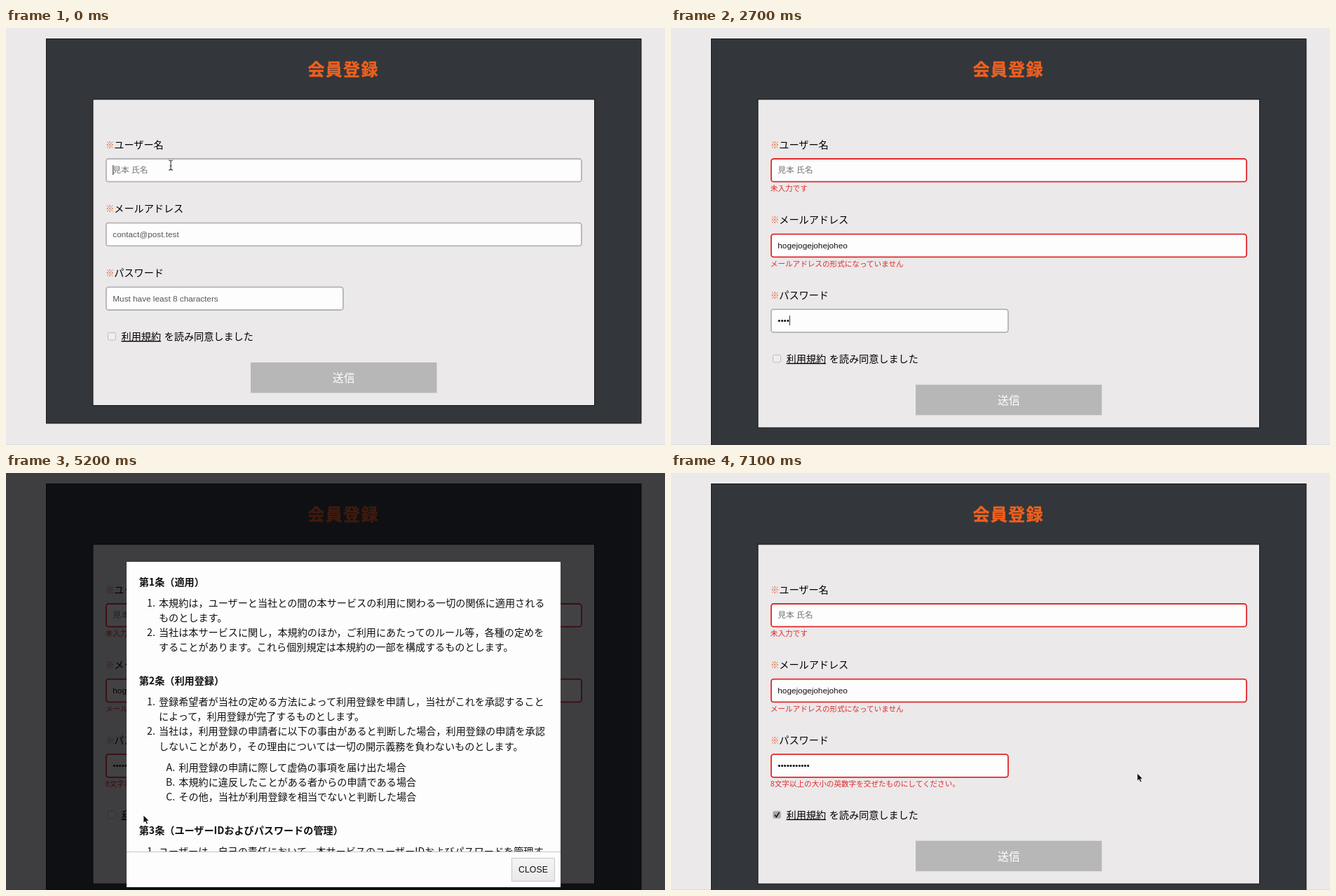
An HTML page for the animation above (7.2 s loop, 940 by 596 pixels).

```html
<!DOCTYPE html>
<html lang="ja">
<head>
<meta charset="utf-8">
<title>会員登録</title>
<style>
  html, body { margin: 0; width: 100%; height: 100%; overflow: hidden; background: #ebe9ea; }
  body { font: 14.13px/21.2px "Noto Sans CJK JP", "Noto Sans CJK", sans-serif; color: #111;
         text-spacing-trim: space-all; text-autospace: no-autospace; }
  svg, #modal { position: absolute; left: 0; top: 0; width: 940px; height: 596px; }
  .star { font-size: 12.36px; fill: #ee5a26; }
  .latin { font: 11.78px "Liberation Sans", Arial, sans-serif; }
  .field { fill: #fdfdfd; stroke-width: 1.8; }
  .error { font-size: 10.6px; fill: #e2282a; }
  #modal { background: rgba(4, 4, 8, .745); }
  #dialog { position: absolute; left: 172px; top: 127px; width: 619px; height: 465px; background: #fdfdfd; }
  #view { position: relative; height: 414px; overflow: hidden; border-bottom: 1px solid #c4c4c4; }
  #terms { position: absolute; top: 0; left: 0; width: 619.5px; box-sizing: border-box; padding: 17.7px 17.7px 0; }
  #thumb { position: absolute; left: 611px; width: 7px; height: 50px; border-radius: 3.5px; background: #6c6c6c; }
  #close { position: absolute; left: 549px; top: 423px; width: 60px; height: 32px; border: 1px solid #c6c6c6;
           background: linear-gradient(#f4f4f4, #e9e9e9); text-align: center;
           font: 12.36px/32px "Liberation Sans", Arial, sans-serif; }
  h3 { font-size: 14.13px; line-height: 21.2px; margin: 0 0 8.83px; }
  p, ol { margin: 0 0 26.5px; }
  ol { padding-left: 26.3px; }
  li { padding-left: 2px; }
  ol ol { margin: 8.83px 0 0; list-style: upper-alpha; }
</style>
</head>
<body>
<svg id="form" viewBox="0 0 940 596">
  <rect y="595" width="940" height="1" fill="#dddcdd"/>
  <rect id="outer" x="57.5" y="15.5" width="848.5" fill="#33373c" stroke="#14171a"/>
  <text x="430.5" y="68" font-size="24" font-weight="700" letter-spacing="1.3" fill="#f0601e" stroke="#f0601e" stroke-width=".4">会員登録</text>
  <rect id="inner" x="124" y="102" width="715.5" fill="#ebe9ea" stroke="#111"/>
  <g id="user"></g>
  <g id="mail"></g>
  <g id="pass"></g>
  <g id="submit">
    <rect id="box" x="145.5" y="435.5" width="11" height="10.5" rx="2" stroke="#bdbdbd"/>
    <path id="tick" d="M148 441l2.4 2.8 4-6.4" fill="none" stroke="#222" stroke-width="1.8"/>
    <text x="164.5" y="446" text-decoration="underline">利用規約</text>
    <text x="225.7" y="446">を読み同意しました</text>
    <rect x="349" y="478" width="265.5" height="43.5" fill="#b7b7b7"/>
    <text x="481.7" y="506" font-size="15.9" text-anchor="middle" fill="#fff">送信</text>
  </g>
</svg>
<div id="modal">
  <div id="dialog">
    <div id="view"><div id="terms"></div><div id="thumb"></div></div>
    <div id="close">CLOSE</div>
  </div>
</div>
<svg viewBox="0 0 940 596">
  <g id="pointer">
    <path id="arrow" d="M0 0V11.3L2.6 9 4.4 13 6.5 12.1 4.8 8.2H8.2Z" fill="#111" stroke="#fff" stroke-width=".8"/>
    <path id="beam" d="M-3-7Q0-7 0-5Q0-7 3-7M0-5V5M-3 7Q0 7 0 5Q0 7 3 7M-1.5 1H1.5" fill="none" stroke="#333" stroke-width="1.1"/>
    <path id="hand" d="M-3-6Q-1.5-8 0-5L1.3-2 4-1.5 6.3 0 6.5 4 5 8.5H-.5L-4.5 3.5-5.5.5-3 1-1-.2Z M1 3V6M3.2 3V6" fill="#fff" stroke="#222" stroke-width="1.2"/>
  </g>
</svg>
<script>
const $ = id => document.getElementById(id);
const show = (id, on) => $(id).style.visibility = on ? 'visible' : 'hidden';
const ROW = 15.9;      // height an error message adds
const LOOP = 7200, STEP = 100;

// Form fields
const fields = {
  user: { top: 187, width: 678, label: 'ユーザー名', hint: '見本 氏名', error: '未入力です' },
  mail: { top: 278.7, width: 678, label: 'メールアドレス', hint: 'contact@post.test', error: 'メールアドレスの形式になっていません' },
  pass: { top: 370.3, width: 338, label: 'パスワード', hint: 'Must have least 8 characters', error: '8文字以上の大小の英数字を交ぜたものにしてください。' }
};
for (const [id, { top, width, label, error }] of Object.entries(fields)) {
  $(id).innerHTML = `
    <text class="star" x="142" y="${top - 15.5}">※</text>
    <text x="154.3" y="${top - 15.5}">${label}</text>
    <rect class="field" id="${id}Box" x="142.9" y="${top}" width="${width}" height="32.7" rx="3.5"/>
    <text class="latin" id="${id}Text" x="152.3" y="${top + 20.3}"></text>
    <rect id="${id}Caret" y="${top + 9}" width="1" height="14" fill="#222"/>
    <text class="error" id="${id}Error" x="141.8" y="${top + 46}">${error}</text>`;
}
$('mail').insertAdjacentHTML('beforeend',
  '<path id="spell" d="M152.5 301.5H252" stroke="#e2282a" stroke-width="1.6" stroke-dasharray="1.6 1.2"/>');

// Terms: an article body is a paragraph or a list; a list item may carry a sublist
const articles = [
  ['適用', ['本規約は，ユーザーと当社との間の本サービスの利用に関わる一切の関係に適用されるものとします。',
    '当社は本サービスに関し，本規約のほか，ご利用にあたってのルール等，各種の定めをすることがあります。これら個別規定は本規約の一部を構成するものとします。']],
  ['利用登録', ['登録希望者が当社の定める方法によって利用登録を申請し，当社がこれを承認することによって，利用登録が完了するものとします。',
    ['当社は，利用登録の申請者に以下の事由があると判断した場合，利用登録の申請を承認しないことがあり，その理由については一切の開示義務を負わないものとします。',
      ['利用登録の申請に際して虚偽の事項を届け出た場合', '本規約に違反したことがある者からの申請である場合', 'その他，当社が利用登録を相当でないと判断した場合']]]],
  ['ユーザーIDおよびパスワードの管理', ['ユーザーは，自己の責任において，本サービスのユーザーIDおよびパスワードを管理するものとします。',
    'ユーザーは，いかなる場合にも，ユーザーIDおよびパスワードを第三者に譲渡または貸与することはできません。',
    'ユーザーIDおよびパスワードが第三者によって使用されたことによって生じた損害は，当社に故意または重大な過失がある場合を除き，当社は一切の責任を負わないものとします。']],
  ['利用料金および支払方法', ['ユーザーは，本サービスの有料部分の対価として，当社が別途定める利用料金を，当社が指定する方法により支払うものとします。',
    'ユーザーが利用料金の支払を遅滞した場合には，ユーザーは年14.6％の割合による遅延損害金を支払うものとします。']],
  ['禁止事項', [['ユーザーは，本サービスの利用にあたり，以下の行為をしてはなりません。',
    ['法令または公序良俗に違反する行為', '犯罪行為に関連する行為', '本サービスに含まれる知的財産権を侵害する行為', 'サーバーまたはネットワークの機能を破壊したり，妨害したりする行為',
      '本サービスによって得られた情報を商業的に利用する行為', '当社のサービスの運営を妨害するおそれのある行為', '不正アクセスをし，またはこれを試みる行為', '他のユーザーに関する個人情報等を収集または蓄積する行為',
      '不正な目的を持って本サービスを利用する行為', '他のユーザーに不利益，損害，不快感を与える行為', '他のユーザーに成りすます行為', '面識のない異性との出会いを目的とした行為', 'その他，当社が不適切と判断する行為']]]],
  ['本サービスの提供の停止等', [['当社は，以下のいずれかの事由があると判断した場合，ユーザーに事前に通知することなく本サービスの全部または一部の提供を停止または中断することができるものとします。',
    ['本サービスにかかるコンピュータシステムの保守点検または更新を行う場合', '地震，落雷，火災，停電または天災などの不可抗力により，本サービスの提供が困難となった場合',
      'コンピュータまたは通信回線等が事故により停止した場合', 'その他，当社が本サービスの提供が困難と判断した場合']],
    '当社は，本サービスの提供の停止または中断により，ユーザーまたは第三者が被ったいかなる不利益または損害についても，一切の責任を負わないものとします。']],
  ['利用制限および登録抹消', [['当社は，ユーザーが以下のいずれかに該当する場合には，事前の通知なく，ユーザーに対して，本サービスの全部もしくは一部の利用を制限し，またはユーザーとしての登録を抹消することができるものとします。',
    ['本規約のいずれかの条項に違反した場合', '登録事項に虚偽の事実があることが判明した場合', '料金等の支払債務の不履行があった場合', '当社からの連絡に対し，一定期間返答がない場合',
      '本サービスについて，最後の利用から一定期間利用がない場合', 'その他，当社が本サービスの利用を適当でないと判断した場合']],
    '当社は，本条に基づき当社が行った行為によりユーザーに生じた損害について，一切の責任を負いません。']],
  ['退会', 'ユーザーは，当社の定める退会手続により，本サービスから退会できるものとします。'],
  ['保証の否認および免責事項', ['当社は，本サービスに事実上または法律上の瑕疵がないことを明示的にも黙示的にも保証しておりません。',
    '当社は，本サービスに起因してユーザーに生じたあらゆる損害について一切の責任を負いません。ただし，本サービスに関する契約が消費者契約となる場合，この免責規定は適用されません。',
    '当社は，ユーザーと他のユーザーまたは第三者との間において生じた取引，連絡または紛争等について一切責任を負いません。']],
  ['サービス内容の変更等', '当社は，ユーザーに通知することなく，本サービスの内容を変更しまたは本サービスの提供を中止することができるものとし，これによってユーザーに生じた損害について一切の責任を負いません。'],
  ['利用規約の変更', '当社は，必要と判断した場合には，ユーザーに通知することなくいつでも本規約を変更することができるものとします。変更後に本サービスの利用を開始した場合には，当該ユーザーは変更後の規約に同意したものとみなします。'],
  ['個人情報の取扱い', '当社は，本サービスの利用によって取得する個人情報については，当社の定める方針に従い適切に取り扱うものとします。'],
  ['通知または連絡', 'ユーザーと当社との間の通知または連絡は，当社の定める方法によって行うものとします。<br>当社は,ユーザーから,当社が別途定める方式に従った変更届け出がない限り,現在登録されて<br>いる連絡先が有効なものとみなして当該連絡先へ通知または連絡を行い,これらは,発信時に<br>ユーザーへ到達したものとみなします。'],
  ['権利義務の譲渡の禁止', 'ユーザーは，当社の書面による事前の承諾なく，利用契約上の地位または本規約に基づく権利もしくは義務を第三者に譲渡し，または担保に供することはできません。'],
  ['準拠法・裁判管轄', ['本規約の解釈にあたっては，日本法を準拠法とします。',
    '本サービスに関して紛争が生じた場合には，当社の本店所在地を管轄する裁判所を専属的合意管轄とします。']]
];
const list = items => `<ol>${items.map(item =>
  Array.isArray(item) ? `<li>${item[0]}${list(item[1])}</li>` : `<li>${item}</li>`).join('')}</ol>`;
$('terms').innerHTML = articles.map(([title, body], i) =>
  `<h3 id="article${i + 1}">第${i + 1}条（${title}）</h3>` + (Array.isArray(body) ? list(body) : `<p>${body}</p>`)
).join('') + '<p><b>以上</b></p>';

// Linear interpolation through [time, ...values] keys
function track(keys, t) {
  const next = keys.findIndex(key => key[0] > t);
  if (next < 0) return keys.at(-1).slice(1);
  if (next === 0) return keys[0].slice(1);
  const a = keys[next - 1], b = keys[next], u = (t - a[0]) / (b[0] - a[0]);
  return a.slice(1).map((v, i) => v + (b[i + 1] - v) * u);
}
const pointerPath = [
  [0, 235, 196], [100, 235, 200], [500, 240, 310], [1400, 240, 310], [1600, 252, 370], [1700, 252, 371],
  [2000, 250, 402], [3700, 250, 416], [4100, 626, 397], [4300, 626, 397], [4900, 196, 489], [5200, 196, 489],
  [5400, 436, 371], [6200, 436, 371], [6600, 746, 569], [6900, 746, 569], [7100, 665, 429]
];
const between = (t, from, to) => t >= from && t < to;
const typed = (t, from, to, count) => Math.max(0, Math.min(count, Math.ceil((t - from + STEP) / (to - from + STEP) * count)));

function setField(id, value, failed, caret) {
  const text = $(id + 'Text');
  text.textContent = value || fields[id].hint;
  text.setAttribute('fill', value ? '#111' : id === 'user' ? '#757575' : '#555');
  $(id + 'Box').setAttribute('stroke', failed ? '#e2282a' : '#b4b4b4');
  show(id + 'Error', failed);
  show(id + 'Caret', caret);
  $(id + 'Caret').setAttribute('x', 152.3 + (value ? text.getComputedTextLength() : 0));
}
const shift = (id, rows) => $(id).setAttribute('transform', `translate(0 ${rows * ROW})`);

function render(t) {
  const userFailed = t >= 600, mailFailed = t >= 2100, passFailed = t >= 4300;
  const dots = t < 3500 ? typed(t, 2500, 3200, 9) : 11;
  setField('user', '', userFailed, t < 500);
  setField('mail', 'hogejogejohejoheo'.slice(0, typed(t, 900, 1500, 17)), mailFailed, between(t, 600, 1700));
  setField('pass', '•'.repeat(dots), passFailed, between(t, 2200, 3800));
  show('spell', between(t, 1600, 2100));

  const rows = userFailed + mailFailed + passFailed;
  shift('mail', +userFailed);
  shift('pass', userFailed + mailFailed);
  shift('submit', rows);
  $('outer').setAttribute('height', 549.5 + rows * ROW);
  $('inner').setAttribute('height', 437.5 + rows * ROW);

  const checked = t >= 6200;
  show('tick', checked);
  $('box').setAttribute('fill', checked ? '#a8a8a8' : '#efeeee');

  show('modal', between(t, 5200, 6900));
  const middle = $('article7').offsetTop - 220.6, end = $('terms').offsetHeight - 412;
  const [scroll, thumb] = track([[5300, 0, 3], [5600, middle, 194], [6100, end, 362]], t);
  $('terms').style.transform = `translateY(${-scroll}px)`;
  $('thumb').style.top = thumb + 'px';
  $('thumb').style.opacity = track([[5300, 0], [5400, 1], [6300, 1], [6600, 0]], t)[0];

  const [x, y] = track(pointerPath, t);
  const overField = t <= 200 || between(t, 400, 1500) || between(t, 2000, 3900);
  const overLink = t === 5100 || between(t, 6600, 7000);
  const hidden = between(t, 900, 1500) || between(t, 2500, 3800);
  $('pointer').setAttribute('transform', `translate(${x} ${y})`);
  show('beam', overField && !hidden);
  show('hand', overLink);
  show('arrow', !overField && !overLink && !hidden);
}

function tick() {
  render(Math.floor(performance.now() % LOOP / STEP) * STEP);
  requestAnimationFrame(tick);
}
tick();
</script>
</body>
</html>
```
